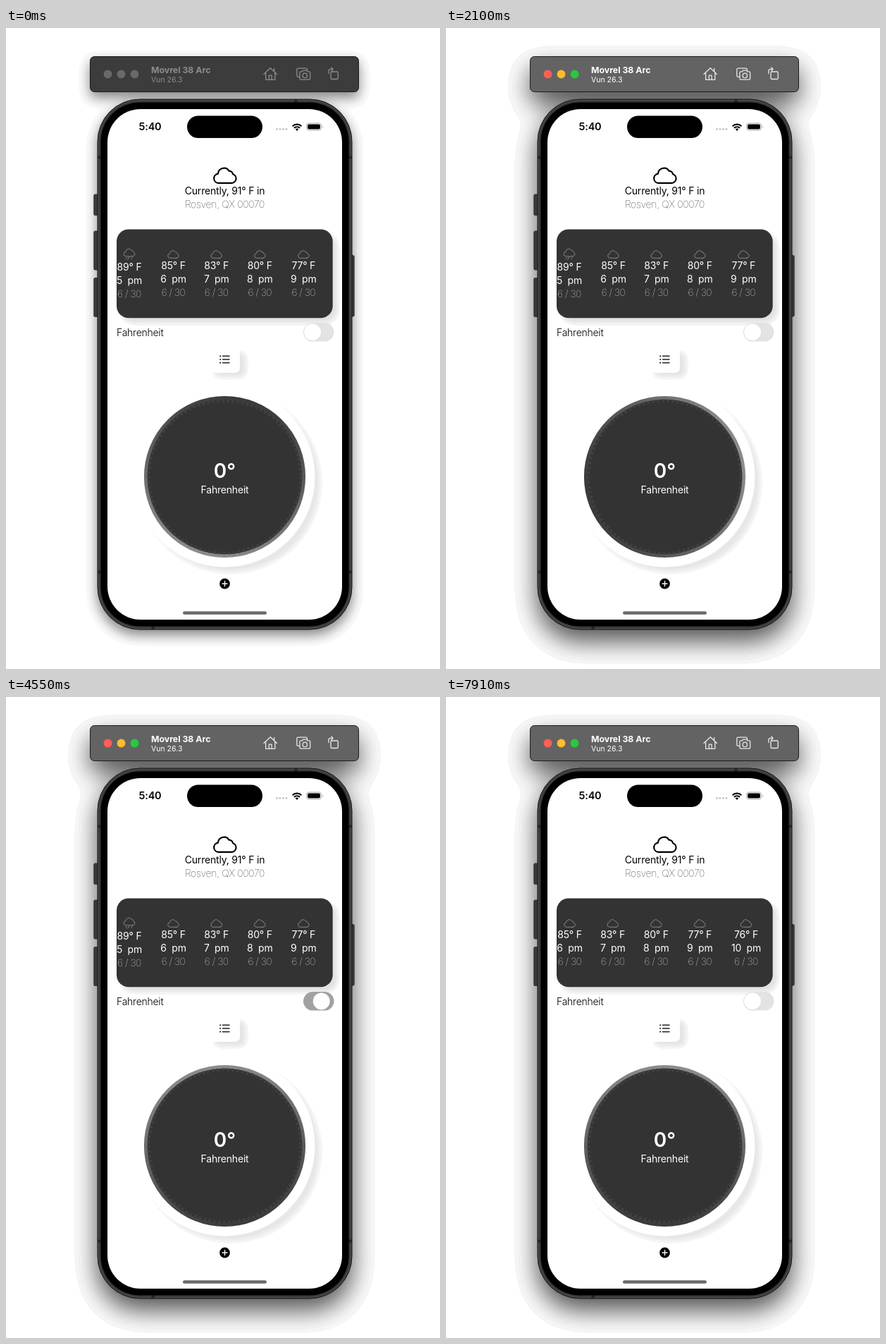
An HTML page for the animation above (8 s loop, 616 by 909 pixels).

```html
<!DOCTYPE html>
<html lang="en">
<head>
<meta charset="utf-8">
<title>Weather dial</title>
<style>
  html, body { margin: 0; width: 100%; height: 100%; overflow: hidden; background: #fff; }
  svg { display: block; width: 616px; height: 909px; font: 400 14px Inter, "Open Sans", sans-serif; letter-spacing: -.2px; }
  text { white-space: pre; }
  .mid { text-anchor: middle; }
  .line { fill: none; stroke-linecap: round; stroke-linejoin: round; }
</style>
</head>
<body>
<svg id="stage" viewBox="0 0 616 909" xmlns="http://www.w3.org/2000/svg"></svg>
<script>
const LOOP = 8000;
const ACTIVATE = 1400;
const SWITCH_ON = 4420, SWITCH_OFF = 6340;
const CELSIUS_FROM = 4620, CELSIUS_TO = 6470;
const RING_PERIOD = 3200, RING_START = 105;
const CX = 310.5, CY = 636.5;

const hours = [
  { x: 175, hour: 5, f: 89, rain: true },
  { x: 237.5, hour: 6, f: 85 },
  { x: 298.7, hour: 7, f: 83 },
  { x: 360.3, hour: 8, f: 80 },
  { x: 422.3, hour: 9, f: 77 },
  { x: 488, hour: 10, f: 76 }
];

// Time and horizontal shift of the forecast strip
const dragKeys = [[2240, 0], [2380, -24], [2560, 0], [2590, 1.3], [3220, 11], [3300, 11], [4100, 0]];

const clamp = v => Math.min(1, Math.max(0, v));
const smooth = v => v * v * (3 - 2 * v);
const mix = (a, b, k) => a + (b - a) * k;

const cloudPath = "M26 22H7.5A6.7 6.7 0 0 1 7.1 8.7A8.5 8.5 0 0 1 22.7 4.7A5.5 5.5 0 0 1 28.2 9.3A6.5 6.5 0 0 1 26 22Z";

function cloud(x, y, scale, width, color) {
  return `<path class="line" d="${cloudPath}" transform="translate(${x} ${y}) scale(${scale})"
    stroke="${color}" stroke-width="${width / scale}"/>`;
}

function rect(x, y, w, h, r, fill, extra = "") {
  return `<rect x="${x}" y="${y}" width="${w}" height="${h}" rx="${r}" fill="${fill}" ${extra}/>`;
}

function circle(x, y, r, fill, extra = "") {
  return `<circle cx="${x}" cy="${y}" r="${r}" fill="${fill}" ${extra}/>`;
}

function label(x, y, text, extra = "") {
  return `<text x="${x}" y="${y}" ${extra}>${text}</text>`;
}

// Blur whose opacity falls in visible steps
function bandedBlur(id, sigma, levels) {
  const steps = Array.from({ length: levels }, (_, i) => i ? (i + 1) / levels : 0).join(" ");
  return `<filter id="${id}" filterUnits="userSpaceOnUse" x="0" y="0" width="616" height="909" color-interpolation-filters="sRGB">
    <feGaussianBlur stdDeviation="${sigma}"/>
    <feComponentTransfer><feFuncA type="discrete" tableValues="${steps}"/></feComponentTransfer>
  </filter>`;
}

function windowShadow(id, dy, filter, opacity) {
  return `<g id="${id}" opacity="${opacity}"><g filter="url(#${filter})"><g transform="translate(0 ${dy})">
    ${rect(119, 40, 382, 51, 6, "#000")}${rect(129.5, 100.5, 362, 752.5, 60, "#000")}
  </g></g></g>`;
}

function forecast({ x, hour, rain }, i) {
  const dy = rain ? 2.2 : 0;
  const drops = rain
    ? `<path class="line" d="M${x - 4} 325.5l-1 2M${x} 324.5l-1 2M${x + 4} 325.5l-1 2M${x - 1.5} 327l-.8 1.4" stroke="#999" stroke-width=".8"/>`
    : "";
  return `<g class="mid" fill="#fff">
    ${cloud(x - 8.5, rain ? 312.8 : 315.3, .5, .8, "#999")}${drops}
    <text id="temp${i}" x="${x}" y="${341.6 + dy}"></text>
    ${label(x, 360.8 + dy, hour + "\u00a0\u00a0pm")}
    ${label(x, 379.8 + dy, "6 / 30", 'style="font-weight:100;letter-spacing:-.5px"')}
  </g>`;
}

function titleBar() {
  return rect(119.5, 40.5, 381, 50, 6, "#3c3c3c", 'id="bar" stroke="#1c1c1c"') +
    [144.5, 163.5, 182.5].map((x, i) => circle(x, 65.5, 5.9, "#696969", `id="light${i}"`)).join("") +
    `<g id="barText" fill="#8c8c8c">
      ${label(206, 64, "Movrel 38 Arc", 'style="font-size:12.3px;font-weight:700;letter-spacing:0"')}
      ${label(206, 77, "Vun 26.3", 'style="font-size:10.5px;letter-spacing:0"')}
    </g>
    <g id="barIcons" class="line" stroke="#8c8c8c" stroke-width="1.3">
      <path d="M366 65.5L375.2 56.7L384.4 65.5M368.6 64V73.3H381.8V64M380.7 61.5V57.5M373.3 73V67.2H377.1V73"/>
      <path d="M416.5 69.3H414.5A1.8 1.8 0 0 1 412.8 67.5V59A1.8 1.8 0 0 1 414.5 57.2H425.8A1.8 1.8 0 0 1 427.5 59V60"/>
      <path d="M418.6 61.8H420.5L421.7 60.2H426.7L427.9 61.8H430A1.7 1.7 0 0 1 431.7 63.5V71.4A1.7 1.7 0 0 1 430 73.1H418.6A1.7 1.7 0 0 1 416.9 71.4V63.5A1.7 1.7 0 0 1 418.6 61.8Z"/>
      <circle cx="424.3" cy="67.4" r="3.2"/>
      <rect x="461" y="62" width="10.3" height="10.5" rx="1.4"/>
      <path d="M457.8 64.5V61.4A3 3 0 0 1 460.8 58.4H464M461.8 56L464.2 58.4L461.8 60.8"/>
    </g>`;
}

function phoneBody() {
  const key = (x, y, h) => rect(x, y, 6, h, 1.5, "#3a3a3a", 'stroke="#222" stroke-width=".8"');
  return key(124.8, 236, 29.5) + key(124.8, 288, 55) + key(124.8, 354.5, 55) + key(488.2, 322.5, 86.5) +
    rect(130, 101, 361, 752, 60, "#36383a", 'stroke="#1b1b1b"') +
    rect(131.6, 102.6, 357.8, 748.8, 58.4, "none", 'stroke="#55585a" stroke-width=".8"') +
    `<path d="M130 183.5h5M486 183.5h5M130 771.5h5M486 771.5h5M411.5 101v5M208.5 848v5" stroke="#222" stroke-width="4"/>` +
    rect(134.5, 105.5, 352, 743, 55.5, "#000") +
    rect(144, 115, 333, 724, 47, "#fff");
}

function statusBar() {
  const dots = [384.5, 389, 393.5, 398].map(x => circle(x, 143.5, 1.4, "#c4c4c4")).join("");
  return label(204.5, 145.2, "5:40", 'class="mid" style="font-weight:600;font-size:14.5px"') +
    rect(257, 124.5, 107, 31.5, 15.75, "#000") + dots +
    `<g class="line" stroke="#000" stroke-width="2.1" style="stroke-linecap:butt">
      <path d="M406.6 139.2A9.3 9.3 0 0 1 419.4 139.2M408.9 141.8A6 6 0 0 1 417.1 141.8"/>
    </g><path d="M410.7 143.6A3.3 3.3 0 0 1 415.3 143.6L413 146Z"/>` +
    rect(426.5, 135, 21, 10, 3.2, "none", 'stroke="#aaa"') +
    rect(428, 136.5, 18, 7, 2, "#000") +
    `<path d="M449 138.4a1.8 1.8 0 0 1 0 3.4z" fill="#aaa"/>`;
}

function listButton() {
  const rows = [465.3, 470, 474.7].map(y =>
    circle(304.2, y, 1.1, "#222") + `<path d="M307.5 ${y}H317" stroke="#222" stroke-width="1.4" stroke-linecap="round"/>`).join("");
  return rect(296, 460, 44, 35, 7, "#000", 'opacity=".1" filter="url(#soft)"') +
    rect(288, 452, 44, 37, 7, "#fff") + rows;
}

function dial() {
  return circle(CX + 8, CY + 8, 127, "#000", 'opacity=".09" filter="url(#soft)"') +
    circle(CX, CY, 128, "#fff") +
    circle(CX, CY, 112.2, "#333", 'stroke="url(#ring)" stroke-width="4.8"') +
    circle(CX, CY, 108, "none", 'stroke="#3f3f3f" stroke-width="4" stroke-dasharray="4 3"') +
    `<g class="mid" fill="#fff">
      ${label(CX, 637.8, "0°", 'style="font-size:28px;font-weight:600;letter-spacing:0"')}
      ${label(CX, 660, "", 'id="dialUnit"')}
    </g>`;
}

document.getElementById("stage").innerHTML = `
  <defs>
    ${bandedBlur("idleBlur", 9, 32)}${bandedBlur("activeBlur", 18, 32)}${bandedBlur("soft", 4, 5)}
    <clipPath id="cardClip">${rect(157, 285.5, 306.7, 125.7, 17, "#000")}</clipPath>
    <linearGradient id="ring" gradientUnits="userSpaceOnUse" x1="${CX - 114}" y1="${CY}" x2="${CX + 114}" y2="${CY}">
      <stop stop-color="#3a3a3a"/><stop offset="1" stop-color="#8c8c8c"/>
    </linearGradient>
  </defs>
  ${windowShadow("idleShadow", 8, "idleBlur", .48)}
  ${windowShadow("activeShadow", 17, "activeBlur", .67)}
  ${titleBar()}${phoneBody()}${statusBar()}
  ${cloud(293.8, 197.9, 1, 2.2, "#000")}
  <text id="now" class="mid" x="${CX}" y="236"></text>
  ${label(CX, 255, "Rosven, QX 00070", 'class="mid" style="font-weight:100;letter-spacing:-.3px"')}
  ${rect(164, 293, 306, 125, 17, "#000", 'opacity=".11" filter="url(#soft)"')}
  ${rect(157, 285.5, 306.7, 125.7, 17, "#333")}
  <g clip-path="url(#cardClip)"><g id="strip">${hours.map(forecast).join("")}</g></g>
  ${label(157, 437, "", 'id="unit" style="font-weight:300;letter-spacing:-.25px"')}
  ${rect(422, 418, 43.5, 26.6, 13.3, "#e3e3e3", 'id="track"')}
  ${circle(435, 432.2, 12.2, "#000", 'id="knobShade" opacity=".08"')}
  ${circle(435, 431.4, 12, "#fff", 'id="knob"')}
  ${listButton()}${dial()}
  ${circle(CX, 788, 7.4, "#000")}
  <path d="M307 788h7M310.5 784.5v7" stroke="#fff" stroke-width="1.4" stroke-linecap="round"/>
  ${rect(251, 827.3, 119, 4.4, 2.2, "#6a6a6a")}`;

const el = id => document.getElementById(id);
const set = (id, name, value) => el(id).setAttribute(name, value);
const write = (id, text) => { if (el(id).textContent !== text) el(id).textContent = text; };

function stripShift(t) {
  if (t >= CELSIUS_FROM) return -62;
  for (let i = 1; i < dragKeys.length; i++) {
    const [t0, v0] = dragKeys[i - 1], [t1, v1] = dragKeys[i];
    if (t >= t0 && t < t1) return mix(v0, v1, smooth((t - t0) / (t1 - t0)));
  }
  return 0;
}

function drawWindow(active) {
  set("idleShadow", "visibility", active ? "hidden" : "visible");
  set("activeShadow", "visibility", active ? "visible" : "hidden");
  set("bar", "fill", active ? "#636363" : "#3c3c3c");
  set("barText", "fill", active ? "#fff" : "#8c8c8c");
  set("barIcons", "stroke", active ? "#e8e8e8" : "#8c8c8c");
  ["#ff5f57", "#febc2e", "#28c840"].forEach((c, i) => set("light" + i, "fill", active ? c : "#696969"));
}

function drawUnits(celsius) {
  const degrees = f => celsius ? Math.round((f - 32) / 1.8) + "° C" : f + "° F";
  const unit = celsius ? "Celsius" : "Fahrenheit";
  write("now", `Currently, ${degrees(91)} in`);
  write("unit", unit);
  write("dialUnit", unit);
  hours.forEach((h, i) => write("temp" + i, degrees(h.f)));
}

function drawSwitch(t) {
  const progress = span => clamp((t - SWITCH_ON) / span) - clamp((t - SWITCH_OFF) / span);
  const gray = Math.round(mix(227, 51, progress(350)));
  const x = mix(435, 452, smooth(progress(195)));
  set("track", "fill", `rgb(${gray},${gray},${gray})`);
  set("knob", "cx", x);
  set("knobShade", "cx", x);
}

function draw(t) {
  drawWindow(t >= ACTIVATE);
  drawUnits(t >= CELSIUS_FROM && t < CELSIUS_TO);
  drawSwitch(t);
  set("strip", "transform", `translate(${stripShift(t)} 0)`);
  set("ring", "gradientTransform", `rotate(${RING_START + t / RING_PERIOD * 360} ${CX} ${CY})`);
}

const start = performance.now();
function tick() {
  draw((performance.now() - start) % LOOP);
  requestAnimationFrame(tick);
}
tick();
</script>
</body>
</html>
```
